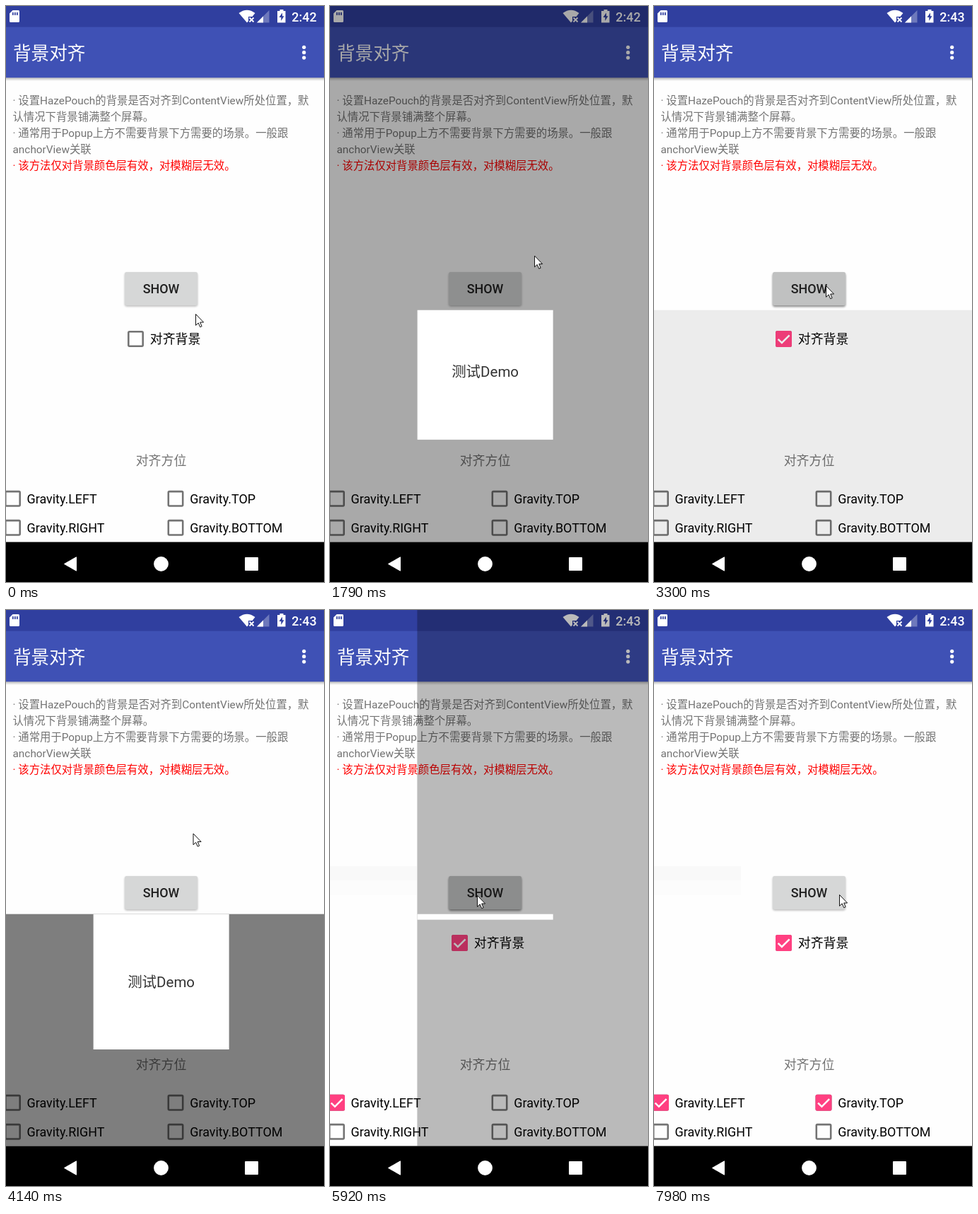
An HTML page for the animation above (8000 ms loop, 450 by 814 pixels).

```html
<!DOCTYPE html>
<html lang="zh-CN">
<head>
<meta charset="utf-8">
<title>背景对齐</title>
<style>
html, body { margin: 0; width: 100%; height: 100%; overflow: hidden; background: #fefefe; }
svg { display: block; width: 450px; height: 814px; }
text { font-family: Roboto, "Noto Sans CJK SC", "Noto Sans CJK", sans-serif; white-space: pre; }
.note { font-size: 15.36px; fill: #737373; }
.label { font-size: 17.92px; fill: #000; }
.bold { font-size: 17.92px; font-weight: 500; }
</style>
</head>
<body>
<svg viewBox="0 0 450 814">
  <defs>
    <linearGradient id="fade" x2="0" y2="1">
      <stop offset="0" stop-opacity=".28"/>
      <stop offset="1" stop-opacity="0"/>
    </linearGradient>
    <filter id="blur" x="-20%" y="-40%" width="140%" height="180%"><feGaussianBlur stdDeviation="1.5"/></filter>
    <clipPath id="buttonClip"><rect x="168" y="376" width="103" height="47" rx="2.5"/></clipPath>
    <clipPath id="popupClip"><rect x="123.4" y="429.7" width="192.4" height="192"/></clipPath>
    <g id="box"><rect x="-10.2" y="-10.2" width="20.4" height="20.4" rx="1.4" fill="none" stroke="#737373" stroke-width="2.56"/></g>
  </defs>

  <rect width="450" height="814" fill="#fefefe"/>
  <g id="band" visibility="hidden">
    <rect y="362" width="123" height="20" fill="#f9f9f9"/>
    <rect y="382" width="123" height="21" fill="#fcfcfc"/>
  </g>

  <!-- bars -->
  <rect y="101" width="450" height="5" fill="url(#fade)"/>
  <rect width="450" height="30" fill="#303f9f"/>
  <rect y="29.7" width="450" height="71.6" fill="#3f51b5"/>
  <g fill="#fff">
    <path fill-rule="evenodd" d="M9.5 6H17.5Q19 6 19 7.500V21.500Q19 23 17.500 23H6.500Q5 23 5 21.500V10.500ZM9 9V13H10.700V9ZM12 9V13H13.700V9ZM15 9V13H16.700V9Z"/>
    <path d="M329.500 10Q341 1.500 352.500 10L348.500 15H343V21.200L341 23.500Z"/>
    <path d="M344.500 16.500L350.500 22.500M350.500 16.500L344.500 22.500" stroke="#fff" stroke-width="1.800"/>
    <path d="M355 23.500L372.500 6V23.500Z" opacity=".3"/>
    <path d="M355 23.500L364 14.500V23.500Z"/>
    <path fill-rule="evenodd" d="M387.500 5H392.500V7H395.500V23.500H384V7H387.500ZM391 9.500L386.500 16H389.300V21L393.500 14.200H391Z"/>
    <circle cx="421.700" cy="58.300" r="2.600"/>
    <circle cx="421.700" cy="65.700" r="2.600"/>
    <circle cx="421.700" cy="73.100" r="2.600"/>
    <text id="clock" class="bold" x="404.300" y="21.500">2:42</text>
    <text x="10" y="75.800" font-size="25.600">背景对齐</text>
  </g>

  <g class="note">
    <text x="9.500" y="138.600">· 设置HazePouch的背景是否对齐到ContentView所处位置，默</text>
    <text x="9.500" y="161.600">认情况下背景铺满整个屏幕。</text>
    <text x="9.500" y="184.600">· 通常用于Popup上方不需要背景下方需要的场景。一般跟</text>
    <text x="9.500" y="207.600">anchorView关联</text>
    <text x="9.500" y="230.600" fill="#f00">· 该方法仅对背景颜色层有效，对模糊层无效。</text>
  </g>

  <!-- button -->
  <rect id="lift" x="168" y="378.500" width="103" height="47" rx="3" opacity="0" filter="url(#blur)"/>
  <rect x="168" y="377.500" width="103" height="47" rx="3" opacity=".28" filter="url(#blur)"/>
  <rect x="168" y="376" width="103" height="47" rx="2.500" fill="#d6d7d7"/>
  <g clip-path="url(#buttonClip)"><circle id="press" cy="400" r="0"/></g>
  <text class="bold" x="219.500" y="406.200" text-anchor="middle" fill="#202020">SHOW</text>

  <text class="label" x="203.800" y="477.200">对齐背景</text>
  <text class="label" x="183.700" y="649.400" style="fill:#737373">对齐方位</text>
  <text class="label" x="29.500" y="703.200">Gravity.LEFT</text>
  <text class="label" x="260.300" y="703.200">Gravity.TOP</text>
  <text class="label" x="29.500" y="744.200">Gravity.RIGHT</text>
  <text class="label" x="260.300" y="744.200">Gravity.BOTTOM</text>
  <g id="boxes"></g>

  <!-- popup -->
  <rect id="dim" opacity="0"/>
  <g clip-path="url(#popupClip)">
    <g id="popup">
      <rect x="123.400" y="429.700" width="192.400" height="191.300" fill="#fff"/>
      <text x="219.600" y="532.500" font-size="20.480" text-anchor="middle" fill="#333">测试Demo</text>
    </g>
  </g>

  <!-- navigation -->
  <rect y="757.500" width="450" height="57" fill="#000"/>
  <g fill="#fff">
    <path d="M82.500 788.500L99.500 778.800V798.200Z" stroke="#fff" stroke-linejoin="round"/>
    <circle cx="219.500" cy="788.500" r="10.400"/>
    <rect x="338" y="779" width="19" height="19" rx="1"/>
  </g>
  <path id="cursor" d="M.5 .5V16.300L4.200 12.900L6.700 18.700L9.100 17.700L6.700 12H11.600Z" fill="#fff" stroke="#111" stroke-width="1"/>
</svg>

<script>
const LOOP = 8000, SLIDE = 191.3;
const $ = id => document.getElementById(id);
const set = (el, attrs) => { for (const k in attrs) el.setAttribute(k, attrs[k]); };
const part = (t, start, length) => Math.min(1, Math.max(0, (t - start) / length));
const decel = p => 1 - (1 - p) ** 2;
const smooth = p => (1 - Math.cos(Math.PI * p)) / 2;

// start, end, x, y
const moves = [
  [0, 0, 268, 435], [30, 140, 253, 432.5], [140, 260, 236, 439],
  [410, 580, 235, 401], [1030, 1450, 289.5, 352], [1760, 2480, 186, 468],
  [2760, 3080, 243, 395], [3380, 3710, 264.5, 315.5], [4180, 4820, 87, 693],
  [5000, 5060, 77, 704], [5260, 5650, 208, 403], [6030, 6340, 264.5, 336],
  [6850, 7480, 242, 699], [7700, 7980, 262, 402]
];

// open and close times, with the corner where the dimmed area begins
const shows = [
  { open: 930, close: 1746, x: 0, y: 0 },
  { open: 3283, close: 4160, x: 0, y: 429.7 },
  { open: 5840, close: 6815, x: 123.4, y: 0 }
];

// centre and time of tick
const boxes = [
  [183.5, 470.5, 2720], [9.5, 696.3, 5210], [240, 696.3, 7660],
  [9.5, 737.3, Infinity], [240, 737.3, Infinity]
].map(([x, y, at]) => {
  const g = document.createElementNS("http://www.w3.org/2000/svg", "g");
  set(g, { transform: `translate(${x} ${y})` });
  g.innerHTML = `<circle fill="#ff4081" r="0"/><use href="#box"/>
    <g opacity="0"><rect x="-11.5" y="-11.5" width="23" height="23" rx="2.5" fill="#ff4081"/>
    <path d="M-7.9 .3L-2.6 5.5L8.1 -5.2" fill="none" stroke="#fff" stroke-width="2.5"/></g>`;
  $("boxes").append(g);
  return { at, ripple: g.children[0], tick: g.children[2] };
});

function cursorAt(t) {
  let [, , x, y] = moves[0];
  for (const [a, b, nx, ny] of moves.slice(1)) {
    if (t < a) break;
    const p = smooth(part(t, a, b - a));
    x += (nx - x) * p;
    y += (ny - y) * p;
  }
  return [x, y];
}

function drawPopup(t) {
  const s = shows.findLast(s => t >= s.open - 150);
  if (!s) {
    set($("dim"), { opacity: 0 });
    set($("popup"), { visibility: "hidden" });
    set($("press"), { opacity: 0 });
    set($("lift"), { opacity: 0 });
    return;
  }
  const shade = decel(part(t, s.open, 250)) - decel(part(t, s.close, 250));
  set($("dim"), { x: s.x, y: s.y, width: 450 - s.x, height: 757.5 - s.y, opacity: shade / 2 });

  const shown = smooth(part(t, s.open + 30, 390)) - smooth(part(t, s.close, 340));
  set($("popup"), {
    visibility: shown > 0 ? "visible" : "hidden",
    transform: `translate(0 ${(shown - 1) * SLIDE})`
  });

  const held = 1 - part(t, s.open + 120, 250);
  const grow = part(t, s.open - 150, 150);
  set($("press"), { cx: cursorAt(s.open - 150)[0], r: 110 * decel(grow), opacity: .1 * held });
  set($("lift"), { opacity: .25 * held * grow });
}

function draw(t) {
  for (const b of boxes) {
    const p = part(t, b.at, 300);
    set(b.ripple, { r: 24 * decel(p), opacity: .25 * (1 - p) });
    set(b.tick, { opacity: part(t, b.at, 140) });
  }
  drawPopup(t);
  $("clock").textContent = t < 3000 ? "2:42" : "2:43";
  set($("band"), { visibility: t < 5840 ? "hidden" : "visible" });
  set($("cursor"), { transform: `translate(${cursorAt(t)})` });
}

const began = performance.now();
function tick() {
  draw((performance.now() - began) % LOOP);
  requestAnimationFrame(tick);
}
tick();
</script>
</body>
</html>
```
